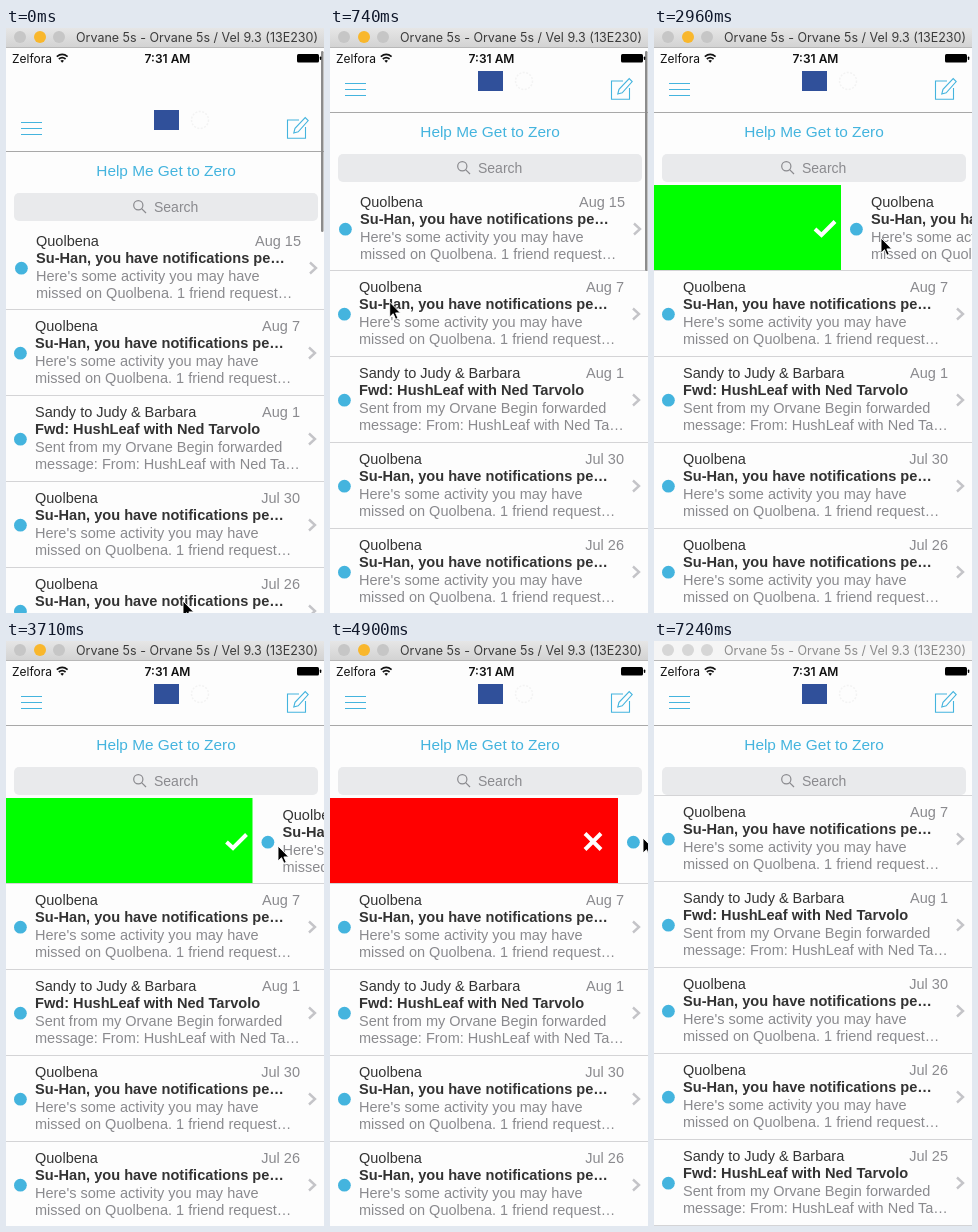
Animation of 318 by 585 pixels, one loop 7340 ms. Source, as an HTML page:

```html
<!DOCTYPE html>
<html lang="en">
<head>
<meta charset="utf-8">
<title>Mail swipe</title>
<style>
html, body { margin: 0; width: 100%; height: 100%; overflow: hidden; background: #fdfdfd; }
svg { display: block; width: 100%; height: 100%; }
text { font: 14.5px "Liberation Sans", Arial, sans-serif; fill: #333; }
.ui { font: 12px Inter, sans-serif; fill: #111; }
.bold { font-size: 14.6px; font-weight: 700; }
.soft { fill: #8a8a8e; }
.line { fill: none; stroke: #44b4de; stroke-width: 1.1; }
</style>
</head>
<body>
<svg viewBox="0 0 318 585" xmlns="http://www.w3.org/2000/svg">
  <defs>
    <linearGradient id="chrome" x2="0" y2="1">
      <stop stop-color="#e6e6e6"/><stop offset="1" stop-color="#d2d2d2"/>
    </linearGradient>
  </defs>
  <rect width="318" height="585" fill="#fdfdfd"/>

  <g id="page">
    <path class="line" d="M15 55.5h21M15 61.5h21M15 67.5h21"/>
    <rect x="148" y="43" width="25" height="20" fill="#30509a"/>
    <circle cx="194" cy="53" r="8.5" fill="none" stroke="#f3f3f3" stroke-width="1.5" stroke-dasharray="2 1.5"/>
    <path class="line" d="M293 53H281.5V71.2H299.5V60M287.8 66l1.2-4.6L299.2 50.6l3 3L292.2 64.8z"/>
    <path d="M0 84.5h318" stroke="#a8a8a8"/>
    <text x="160" y="109.3" text-anchor="middle" style="font-size:15.4px;fill:#44b4de">Help Me Get to Zero</text>
    <rect x="8" y="126" width="304" height="28" rx="5" fill="#e9eaec"/>
    <g fill="none" stroke="#8a8a8e" stroke-width="1.2"><circle cx="132.3" cy="138.3" r="4.6"/><path d="M135.6 141.6l4.4 4.4"/></g>
    <text class="soft" x="148" y="145" style="font-size:14px">Search</text>
    <g id="list"></g>
    <g id="swipe">
      <rect id="panel" y="157" height="85"/>
      <g fill="none" stroke="#fff" stroke-width="4">
        <path id="check" d="M-26 201l6.5 6L-6 193.5"/>
        <path id="cross" d="M-33 192.5l16 16m0-16l-16 16"/>
      </g>
    </g>
  </g>
  <rect id="thumb" x="315" y="23" width="2.5" rx="1.2" fill="#8c8c8c"/>

  <text class="ui" x="6" y="34.5">Zelfora</text>
  <g fill="none" stroke="#111" stroke-width="1.7">
    <path d="M50.8 28.6q5.4-4.4 10.8 0M52.8 31q3.4-2.6 6.8 0"/>
    <path d="M56.2 34.8l-1.8-2q1.8-1.4 3.6 0z" fill="#111" stroke="none"/>
  </g>
  <text class="ui" x="161.5" y="34.5" text-anchor="middle" style="font-weight:600">7:31 AM</text>
  <rect x="291" y="26" width="22" height="8.6" rx="1.5"/>
  <rect x="313.8" y="28.6" width="1.5" height="3.4" rx=".7"/>

  <rect id="bar" width="318" height="20"/>
  <path d="M0 19.5h318" stroke="#b8b8b8"/>
  <g id="lights"><circle cx="14" cy="9" r="6"/><circle cx="34" cy="9" r="6"/><circle cx="53" cy="9" r="6"/></g>
  <text id="title" class="ui" x="191" y="14" text-anchor="middle" style="font-size:12.5px">Orvane 5s - Orvane 5s / Vel 9.3 (13E230)</text>

  <path id="cursor" d="M0 0V15l3.5-3.3 2.4 5.6 2.4-1-2.4-5.4h4.8z" fill="#000" stroke="#fff" stroke-width=".9"/>
</svg>
<script>
const LOOP = 7340, REMOVED = 5050, INACTIVE = 7240, FRAME = 150;
const $ = id => document.getElementById(id);

const notice = ["Quolbena", "Su-Han, you have notifications pe…",
  "Here's some activity you may have", "missed on Quolbena. 1 friend request…"];
const forward = ["Sandy to Judy &amp; Barbara", "Fwd: HushLeaf with Ned Tarvolo",
  "Sent from my Orvane Begin forwarded", "message: From: HushLeaf with Ned Ta…"];
const mails = [[notice, "Aug 15"], [notice, "Aug 7"], [forward, "Aug 1"],
  [notice, "Jul 30"], [notice, "Jul 26"], [forward, "Jul 25"]];

function mailRow([[from, subject, line1, line2], date], i) {
  const y = i ? 86 * i - 1 : 0;
  return `<g transform="translate(${i ? -1 : 0} ${y})">
    <g class="mail">
      <circle cx="15.4" cy="201.2" r="6.4" fill="#44b4de"/>
      <text x="30" y="179">${from}</text>
      <text x="295" y="179" text-anchor="end" class="soft">${date}</text>
      <text x="30" y="196.3" class="bold">${subject}</text>
      <text x="30" y="213.5" class="soft">${line1}</text>
      <text x="30" y="230.5" class="soft">${line2}</text>
      <path d="M304 195.5l6 5.5-6 5.5" fill="none" stroke="#c4c4c8" stroke-width="2.4"/>
    </g>
    <path d="M0 ${i ? 243.5 : 242.5}h320" stroke="#d4d4d6"/>
  </g>`;
}
$("list").innerHTML = mails.map(mailRow).join("");
const firstMail = document.querySelector(".mail");

const spans = [[0, 1180], [1930, 2660], [2960, 3110], [3410, 4450],
  [4600, REMOVED], [6250, 6700], [INACTIVE, INACTIVE]];

function snap(t) {
  const [start, end] = spans.filter(s => s[0] <= t).pop();
  return t >= end ? end : start + FRAME * Math.floor((t - start) / FRAME);
}

// time, row offset, pointer x, pointer y
const drag = [[1930, 0, 26, 216], [2080, 8, 38, 215], [2660, 147, 184, 212],
  [2960, 187, 227, 210], [3110, 207, 242, 209], [3410, 232, 260, 207],
  [3710, 246.5, 272, 205], [4450, 281, 307, 199], [4900, 288, 313, 197]];
const leave = [[6250, 0, 252, 402], [6550, 0, 234, 562]];

function sample(keys, t) {
  if (t <= keys[0][0]) return keys[0].slice(1);
  const n = keys.findIndex(k => k[0] >= t);
  if (n < 0) return keys[keys.length - 1].slice(1);
  const a = keys[n - 1], b = keys[n], f = (t - a[0]) / (b[0] - a[0]);
  return a.slice(1).map((v, i) => v + (b[i + 1] - v) * f);
}

function pointer(t) {
  if (t < 1930) {
    const s = t / 1000;
    return [26 + 151 * Math.exp(-2.5 * s), 216 + 357 * Math.exp(-3.03 * s)];
  }
  if (t < REMOVED) return sample(drag, t).slice(1);
  return t >= 6250 && t < 6700 ? sample(leave, t).slice(1) : [-40, -40];
}

const move = (el, x, y) => el.setAttribute("transform", `translate(${x} ${y})`);
const show = (el, on) => el.setAttribute("visibility", on ? "visible" : "hidden");

function draw(now) {
  const t = snap(now % LOOP);

  const pull = Math.round(39 * Math.exp(-t / 117));
  move($("page"), 0, pull);
  $("thumb").setAttribute("height", 220 - pull);
  $("thumb").setAttribute("opacity", Math.max(0, Math.min(1, (1050 - t) / 300)));

  const removed = t >= REMOVED;
  const edge = removed ? 0 : sample(drag, t)[0];
  const red = edge > 256, open = edge > 32;
  move(firstMail, edge, 0);
  show(firstMail, !removed);
  move($("list"), 0, removed ? -88 : 0);
  $("panel").setAttribute("width", edge);
  $("panel").setAttribute("fill", red ? "#f00" : "#0f0");
  show($("panel"), open);
  show($("check"), open && !red);
  show($("cross"), red);
  move($("check"), edge, 0);
  move($("cross"), edge, 0);

  const [x, y] = pointer(t);
  move($("cursor"), x.toFixed(1), y.toFixed(1));

  const active = t < INACTIVE;
  $("bar").setAttribute("fill", active ? "url(#chrome)" : "#f5f5f5");
  $("title").style.fill = active ? "#3c3c3c" : "#8c8c8c";
  [...$("lights").children].forEach((c, i) =>
    c.setAttribute("fill", !active ? "#d6d6d6" : i === 1 ? "#f9b72c" : "#c6c6c6"));
}

const begin = performance.now();
function tick() {
  draw(performance.now() - begin);
  requestAnimationFrame(tick);
}
tick();
</script>
</body>
</html>
```
